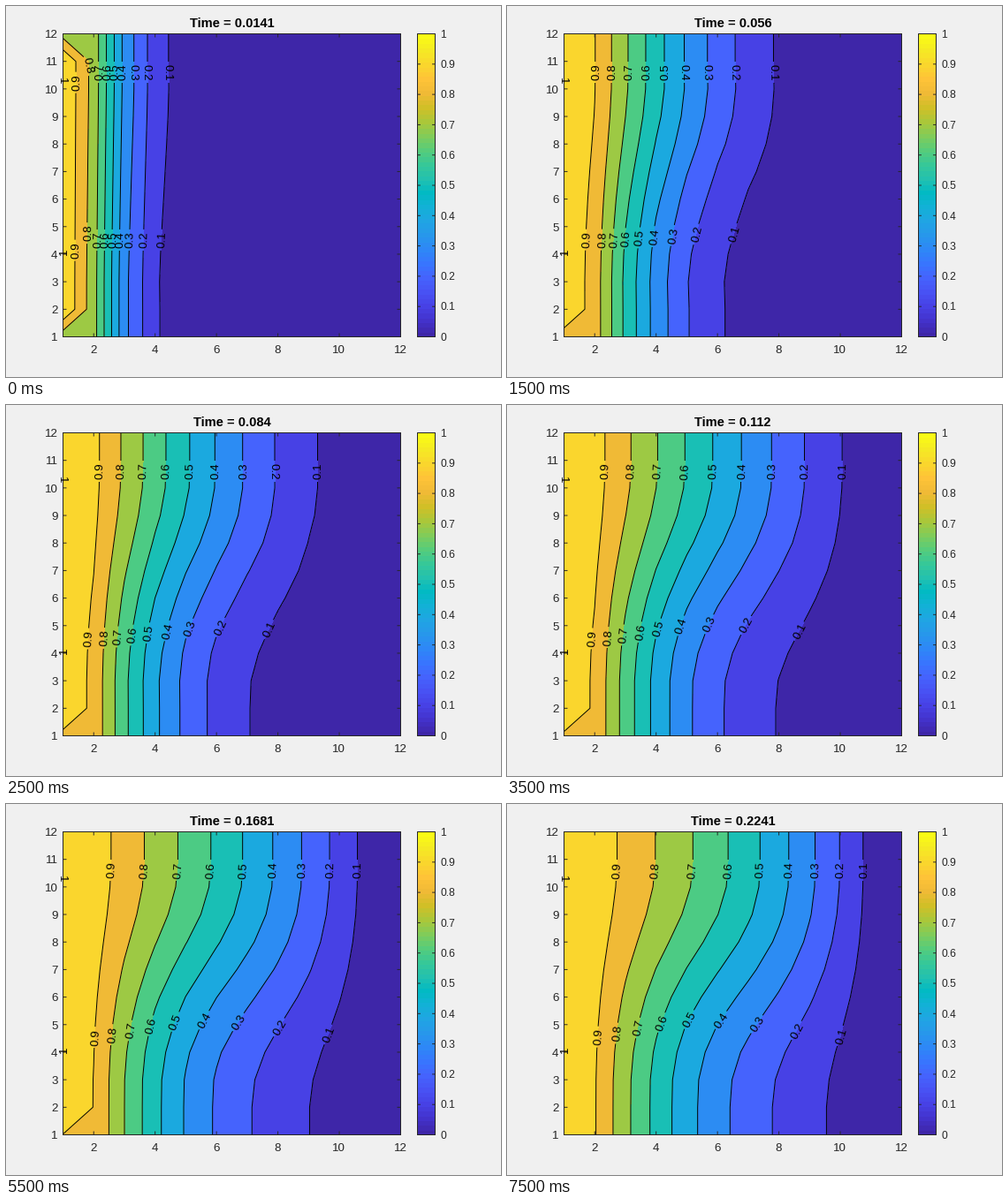
Write a matplotlib script that moves like this. It is 560 by 420 pixels and loops after 8 s.

```python
import numpy as np
import matplotlib.pyplot as plt
from matplotlib.animation import FuncAnimation
from matplotlib.colors import ListedColormap
from matplotlib.patches import Rectangle

W, H, DPI = 560, 420, 100
FRAMES, INTERVAL = 16, 500
LEFT, RIGHT, TOP, BOTTOM = 64.5, 446.5, 31.5, 374.5
CB_LEFT, CB_RIGHT = 465.5, 485.5
INK = "#262626"

# Buoyant slow flow in a unit square: hot left wall, cold right wall
N, RAYLEIGH = 10, 1000
FRAME_DT, STEPS = 0.0140045, 40
LEVELS = np.arange(1, 10) / 10

plt.rcParams.update({"font.family": "Liberation Sans", "path.snap": False})

PARULA = ("3e26a8 4332cb 4741e5 4852f4 4563fd 3875fe 2e87f7 2797eb 20a5e3 12b1d6 02bac3 "
          "24c1ae 37c897 57cc7a 81cc59 abc739 d1bf27 f0ba36 fec338 fad62d f5e924 f9fb15")
stops = np.array([[int(h[i:i + 2], 16) / 255 for i in (0, 2, 4)] for h in PARULA.split()])
cmap = np.column_stack([np.interp(np.arange(64), np.arange(22) * 3, c) for c in stops.T])
bands = [cmap[int(v * 64)] for v in (0, *LEVELS)]


def flow_solver(h):
    """Inverse biharmonic operator for the stream function between no-slip walls."""
    m = N - 1
    eye = np.eye(m)
    d2 = (np.eye(m, k=1) + np.eye(m, k=-1) - 2 * eye) / h**2
    d4 = d2 @ d2
    d4[0, 0] += 2 / h**4
    d4[-1, -1] += 2 / h**4
    return np.linalg.inv(np.kron(d4, eye) + 2 * np.kron(d2, d2) + np.kron(eye, d4))


def with_walls(temp):
    """Temperature field including the wall values, as it is plotted."""
    field = np.pad(temp, 1, mode="edge")
    field[1:-1, 0] = 1
    field[1:-1, -1] = 0
    return field


def simulate():
    h, dt = 1 / N, FRAME_DT / STEPS
    solve = RAYLEIGH * flow_solver(h)
    temp = np.zeros((N, N))
    psi = np.zeros((N + 1, N + 1))
    fields = []
    for step in range(1, FRAMES * STEPS + 1):
        across = np.diff(temp, axis=1)
        torque = (across[1:] + across[:-1]) / (2 * h)
        psi[1:-1, 1:-1] = (solve @ torque.ravel()).reshape(N - 1, N - 1)
        u = np.diff(psi, axis=0) / h
        v = -np.diff(psi, axis=1) / h
        p = np.pad(temp, 1, mode="edge")
        p[:, 0] = 2 - p[:, 1]
        p[:, -1] = -p[:, -2]
        px_, py_ = p[1:-1], p[:, 1:-1]
        fx = u * (px_[:, 1:] + px_[:, :-1]) / 2 - np.diff(px_, axis=1) / h
        fy = v * (py_[1:] + py_[:-1]) / 2 - np.diff(py_, axis=0) / h
        temp = temp - dt / h * (np.diff(fx, axis=1) + np.diff(fy, axis=0))
        if step % STEPS == 0:
            fields.append(with_walls(temp))
    return fields


def px(x):
    return LEFT + (x - 1) / 11 * (RIGHT - LEFT)


def py(y):
    return BOTTOM - (y - 1) / 11 * (BOTTOM - TOP)


fig = plt.figure(figsize=(W / DPI, H / DPI), dpi=DPI, facecolor="#f0f0f0")
ax = fig.add_axes([0, 0, 1, 1])
ax.axis("off")
ax.set(xlim=(0, W), ylim=(H, 0), autoscale_on=False)


def text(x, y, s, size, **kw):
    return ax.text(x, y, s, fontsize=size * 72 / DPI, **kw)


def line(x, y, color=INK, z=5):
    return ax.plot(x, y, color=color, lw=0.7, zorder=z, solid_capstyle="butt")[0]


def label(x, y, s, angle):
    return text(x, y, s, 13.33, color="k", ha="center", va="center_baseline",
                rotation=angle, rotation_mode="anchor", zorder=6)


def draw_axes():
    for x0, x1 in ((LEFT, RIGHT), (CB_LEFT, CB_RIGHT)):
        ax.add_patch(Rectangle((x0, TOP), x1 - x0, BOTTOM - TOP,
                               fc="none", ec=INK, lw=0.72, zorder=5))
    for n in range(2, 13, 2):
        line([px(n)] * 2, [BOTTOM, BOTTOM - 4])
        line([px(n)] * 2, [TOP, TOP + 4])
        text(px(n) - 0.5, 393, str(n), 13.33, color=INK, ha="center")
    for n in range(1, 13):
        line([LEFT, LEFT + 4], [py(n)] * 2)
        line([RIGHT, RIGHT - 4], [py(n)] * 2)
        text(58.5, py(n) + 4.8, str(n), 13.33, color=INK, ha="right")


def draw_colorbar():
    ax.pcolormesh([CB_LEFT, CB_RIGHT], np.linspace(BOTTOM, TOP, 65),
                  np.arange(64)[:, None], cmap=ListedColormap(cmap))
    for n in range(11):
        y = BOTTOM - n / 10 * (BOTTOM - TOP)
        line([CB_LEFT, CB_LEFT + 3.4], [y, y])
        line([CB_RIGHT, CB_RIGHT - 3.4], [y, y])
        text(491, y + 4.3, f"{n / 10:g}", 12, color=INK)


def draw_isotherm(path, name):
    """Line from the top down, broken by two labels at fixed lengths along it."""
    x, y = (path if path[0, 1] < path[-1, 1] else path[::-1]).T
    arc = np.r_[0, np.cumsum(np.hypot(np.diff(x), np.diff(y)))]

    def at(a):
        return np.interp(a, arc, x), np.interp(a, arc, y)

    spots = (43.5, 233.5)
    ends = [0, *(s + d for s in spots for d in (-12, 12)), arc[-1]]
    for a, b in zip(ends[::2], ends[1::2]):
        live.append(line(*at(np.r_[a, arc[(arc > a) & (arc < b)], b]), color="k", z=3))
    for s in spots:
        (x0, y0), (x1, y1) = at(s - 9), at(s + 9)
        angle = np.degrees(np.arctan2(y1 - y0, x0 - x1))
        live.append(label(*at(s), name, angle - 180 if angle > 90.01 else angle))


draw_axes()
draw_colorbar()
label(64.5, 85, "1", -90)
label(64.5, 278, "1", 90)
title = text(255.5, 24, "", 14.67, color="k", weight="bold", ha="center")

fields = simulate()
grid_x, grid_y = px(np.arange(1, 13)), py(np.arange(1, 13))
live = []


def update(k):
    while live:
        live.pop().remove()
    # the first snapshot is taken just after its due time
    t = max(FRAME_DT * (k + 1), 0.01406)
    title.set_text(f"Time = {round(t, 4):g}")
    live.append(ax.contourf(grid_x, grid_y, fields[k], LEVELS, colors=bands,
                            extend="both", zorder=1))
    curves = ax.contour(grid_x, grid_y, fields[k], LEVELS)
    for value, paths in zip(LEVELS, curves.allsegs):
        for path in paths:
            draw_isotherm(path, f"{value:g}")
    curves.remove()
    ax.set(xlim=(0, W), ylim=(H, 0))
    return live


anim = FuncAnimation(fig, update, frames=FRAMES, interval=INTERVAL,
                     init_func=lambda: [], repeat=True, repeat_delay=0)
plt.show()
```
